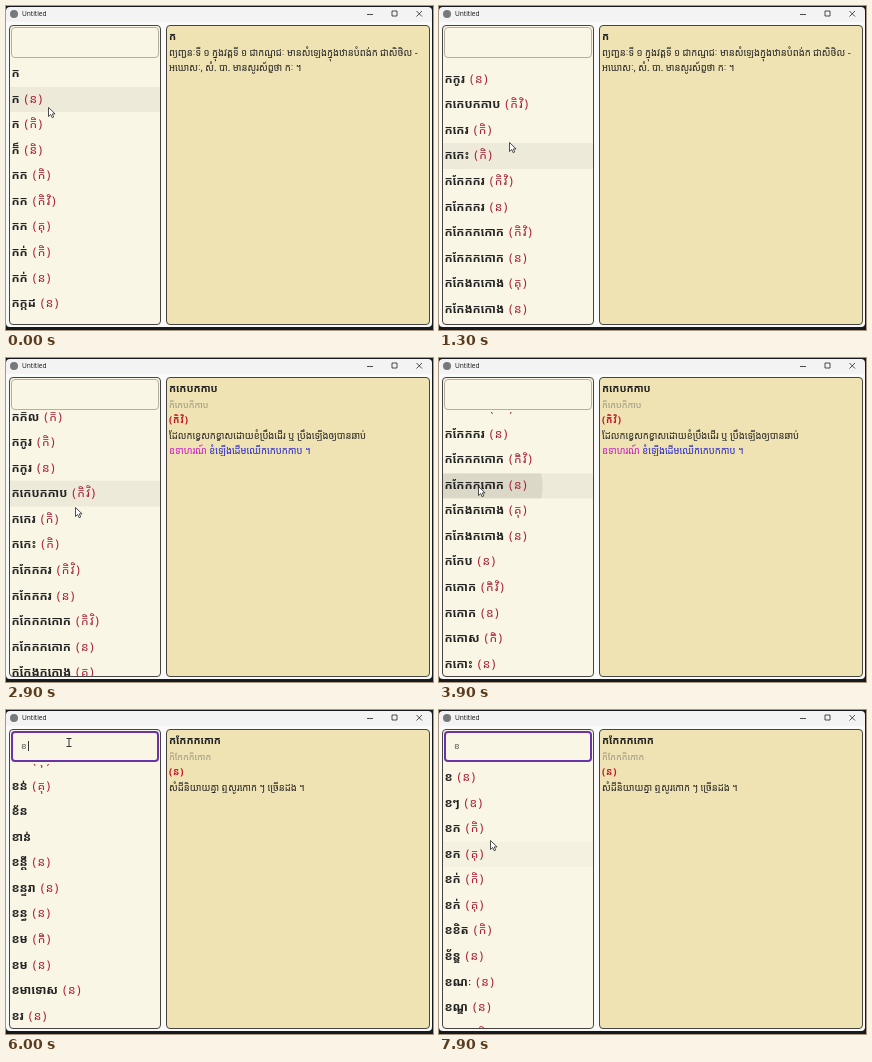
Recreate the animation shown at these times as an HTML page. Size 427 by 324 pixels, loop 8000 ms.

```html
<!DOCTYPE html>
<html lang="km">
<head>
<meta charset="utf-8">
<title>Untitled</title>
<style>
html, body { margin: 0; width: 100%; height: 100%; overflow: hidden; }
body { position: relative; background: #17191c; font-family: "Noto Sans Khmer", "Noto Sans", sans-serif; color: #222; }
div, svg { position: absolute; box-sizing: border-box; white-space: nowrap; }
#window { left: 0; top: 1px; width: 426px; height: 320px; border-radius: 4px; background: linear-gradient(#f3f3f3 15px, #fafafa 15px); }
#icon { left: 4px; top: 4px; width: 8px; height: 8px; border-radius: 50%; background: #77787c; }
#name { left: 16px; top: 3px; font: 6.6px/10px "Open Sans", sans-serif; color: #111; }
.panel { top: 19px; height: 300px; border: 1px solid #45443e; border-radius: 4px; overflow: hidden; }
#left { left: 3px; width: 152px; background: #faf6e6; }
#right { left: 160px; width: 264px; background: #efe3b3; }
#view { left: 0; top: 34px; width: 150px; height: 264px; overflow: hidden; }
#list { left: 0; top: 1px; width: 150px; }
.row { left: 0; width: 150px; height: 25.57px; overflow: hidden; }
.row span { position: absolute; left: 1.5px; font-size: 12px; line-height: 23px; font-weight: 600; letter-spacing: -.1px; }
.row i { margin-left: 5px; font-style: normal; font-weight: 400; letter-spacing: 1.4px; color: #a91f35; }
#search { left: 5px; top: 21px; width: 148px; height: 31px; border: 1px solid #b3b0a3; border-radius: 4px; background: #faf6e6; }
#search.on { border: 2px solid #6934a6; }
#typed { left: 15px; top: 26px; font-size: 9px; line-height: 20px; color: #55534d; }
#caret { left: 22px; top: 31px; width: 1px; height: 10px; background: #333; }
.page { left: 2px; top: 0; font-size: 9.43px; }
.page div { left: 0; line-height: 16px; }
.page .head { font-size: 10.5px; font-weight: 600; letter-spacing: -.1px; }
.page .soft { font-size: 9px; color: #9b9484; }
.page .tag { font-weight: 600; letter-spacing: .8px; color: #c2182b; }
.mark { color: #c415c4; }
.cite { color: #2222cc; }
#arrow, #beam { left: 0; top: 0; }
</style>
</head>
<body>
<div id="window"></div><div id="icon"></div><div id="name">Untitled</div>
<svg width="427" height="16" fill="none" stroke="#222" stroke-width=".8"><path d="M361 8.500h6M386 5h5v5h-5zM410.500 5l5.500 5.500M416 5l-5.500 5.500"/></svg>
<div id="left" class="panel"><div id="view"><div id="list"></div></div></div>
<div id="right" class="panel"></div>
<div id="search"></div><div id="typed">ខ</div><div id="caret"></div>
<svg id="arrow" width="10" height="14" viewBox="0 0 10 14"><path d="M.5.5v9l2.200-2 1.500 3.200 1.500-.7-1.400-3.100h2.800z" fill="#fff" stroke="#222" stroke-width=".8"/></svg>
<svg id="beam" width="8" height="12" viewBox="0 0 8 12"><path d="M1.500 1.500h5M4 1.500v8M1.500 9.500h5" fill="none" stroke="#333"/></svg>
<script>
const $ = id => document.getElementById(id);
const PITCH = 25.57, LOOP = 8000;

// Each entry is a headword, optionally followed by its word class.
const WORDS_K = `ក|ក ន|ក កិ|ក៏ និ|កក កិ|កក កិវិ|កក គុ|កក់ កិ|កក់ ន|កក្កដ ន|កករ ន|កកាត គុ|កកាយ កិ|កកិចកកុច គុ|កកិត កិ|កកិល កិ|កកូរ កិ|កកូរ ន|កកេបកកាប កិវិ|កកេរ កិ|កកេះ កិ|កកែកករ កិវិ|កកែកករ ន|កកែកកកោក កិវិ|កកែកកកោក ន|កកែងកកោង គុ|កកែងកកោង ន|កកែប ន|កកោក កិវិ|កកោក ឧ|កកោស កិ|កកោះ ន|កខ ន|កង ន|កង កិ`;
const WORDS_KH = `ខ ន|ខៗ ឧ|ខក កិ|ខក គុ|ខក់ កិ|ខក់ គុ|ខខិត កិ|ខ័ន្ឌ ន|ខណៈ ន|ខណ្ឌ ន|ខណ្ឌ កិ|ខណ្ឌសីមា ន|ខត្តិយ ន|ខត្តិយា ន|ខត្តិយានី ន|ខទិរ ន|ខទ្យោត ន|ខន ន|ខន កិ|ខនិជ ន|ខន្តិ ន|ខន់ គុ|ខន់ គុ|ខ័ន|ខាន់|ខន្តី ន|ខន្ទរា ន|ខន្ធ ន|ខម កិ|ខម ន|ខមាទោស ន|ខរ ន|ខល ន`;

const PAGES = [
  [["head", "ក"],
   ["", "ព្យញ្ជនៈទី ១ ក្នុងវគ្គទី ១ ជាកណ្ឋជៈ មានសំឡេងក្នុងឋានបំពង់ក ជាសិថិល -"],
   ["", "អឃោសៈ, សំ. បា. មានសូរស័ព្ទថា កៈ ។"]],
  [["head", "កកេបកកាប"], ["soft", "ក៏កេបក៏កាប"], ["tag", "(កិវិ)"],
   ["", "ដែលកខ្វេសកខ្វាសដោយខំប្រឹងដើរ ឬ ប្រឹងឡើងឲ្យបានឆាប់"],
   ["cite", "<span class='mark'>ឧទាហរណ៍</span> ខំឡើងដើមឈើកកេបកកាប ។"]],
  [["head", "កកែកកកោក"], ["soft", "ក៏កែកក៏កោក"], ["tag", "(ន)"],
   ["", "សំដីនិយាយគ្នា ឮសូរកោក ៗ ច្រើនដង ។"]]
];

// Keys are [time, value...]: SCROLL and MOUSE run linearly, HOVER jumps.
const SCROLL = [[0, 0], [100, 0], [800, 232.5], [1300, 429], [1700, 429], [2100, 378], [2800, 378], [2900, 392.4], [3500, 553.6], [6300, 553.6], [7600, 0]];
const MOUSE = [[0, 43, 101], [800, 58, 137], [1300, 71, 136], [2200, 70, 149], [2900, 70, 149], [3600, 40, 128], [4400, 40, 128], [5000, 63, 32], [6100, 63, 32], [6500, 52, 130]];
const HOVER = [[0, 1], [300, 5], [500, 8], [700, 11], [900, 15], [1100, 18], [1300, 20], [1900, 18], [3200, 22], [3600, 24], [4600, -1], [6500, 25], [6800, 17], [7100, 12], [7400, 6], [7800, 3]];
const CLICKS = [[2300, 18], [3700, 24]];

function at(keys, t) {
  const n = keys.findIndex(k => k[0] > t);
  if (n < 0) return keys[keys.length - 1].slice(1);
  const a = keys[n - 1], b = keys[n], p = (t - a[0]) / (b[0] - a[0]);
  return a.slice(1).map((v, i) => v + (b[i + 1] - v) * p);
}

const hold = (keys, t) => keys.filter(k => k[0] <= t).pop()[1];

function add(parent, html, cls) {
  const el = document.createElement("div");
  el.className = cls;
  el.innerHTML = html;
  return parent.appendChild(el);
}

const lists = [WORDS_K, WORDS_KH].map(words => {
  const box = add($("list"), "", "");
  const rows = words.split("|").map((entry, i) => {
    const [word, kind] = entry.split(" ");
    const row = add(box, `<span>${word}${kind ? `<i>(${kind})</i>` : ""}</span>`, "row");
    row.style.top = i * PITCH + "px";
    return row;
  });
  return { box, rows };
});

const pages = PAGES.map(lines => {
  const page = add($("right"), "", "page");
  lines.forEach(([cls, text], i) => {
    add(page, text, cls).style.top = (i ? 4 + i * 15.2 : 2) + "px";
  });
  return page;
});

const show = (el, on) => { el.style.display = on ? "" : "none"; };
const place = (el, x, y) => { el.style.transform = `translate(${x}px,${y}px)`; };

function rowFill(i, t, hovered, x) {
  const click = CLICKS.find(c => c[1] === i && t >= c[0] && t < c[0] + 500);
  const base = i === hovered ? (t >= 7800 ? "#f4f1e0" : "#eeeada") : "transparent";
  if (!click) return base;
  const r = 21 + (t - click[0]) * .21;
  return `radial-gradient(circle at ${x - 4}px 13px, #dcd8c8 ${r}px, ${base} ${r + 1}px)`;
}

function draw(t) {
  const typed = t >= 5700, focused = t >= 5100;
  const [x, y] = at(MOUSE, t), hovered = hold(HOVER, t);
  place($("list"), 0, -at(SCROLL, t)[0]);
  lists.forEach((list, n) => {
    show(list.box, n === +typed);
    list.rows.forEach((row, i) => { row.style.background = rowFill(i, t, hovered, x); });
  });
  const open = t < 2500 ? 0 : t < 4000 ? 1 : 2;
  pages.forEach((page, n) => show(page, n === open));
  $("search").className = focused ? "on" : "";
  show($("typed"), typed);
  $("caret").style.left = (typed ? 22 : 15) + "px";
  // The blink restarts when a key is pressed.
  show($("caret"), focused && (t - (typed ? 5700 : 5100)) % 1000 < 500 && t < 7700);
  const beam = y < 52;
  show($("arrow"), !beam);
  show($("beam"), beam);
  place($("arrow"), x - 1, y);
  place($("beam"), x - 4, y - 5);
}

function tick(now) {
  draw(Math.floor(now % LOOP / 100) * 100);
  requestAnimationFrame(tick);
}
draw(0);
requestAnimationFrame(tick);
</script>
</body>
</html>
```
